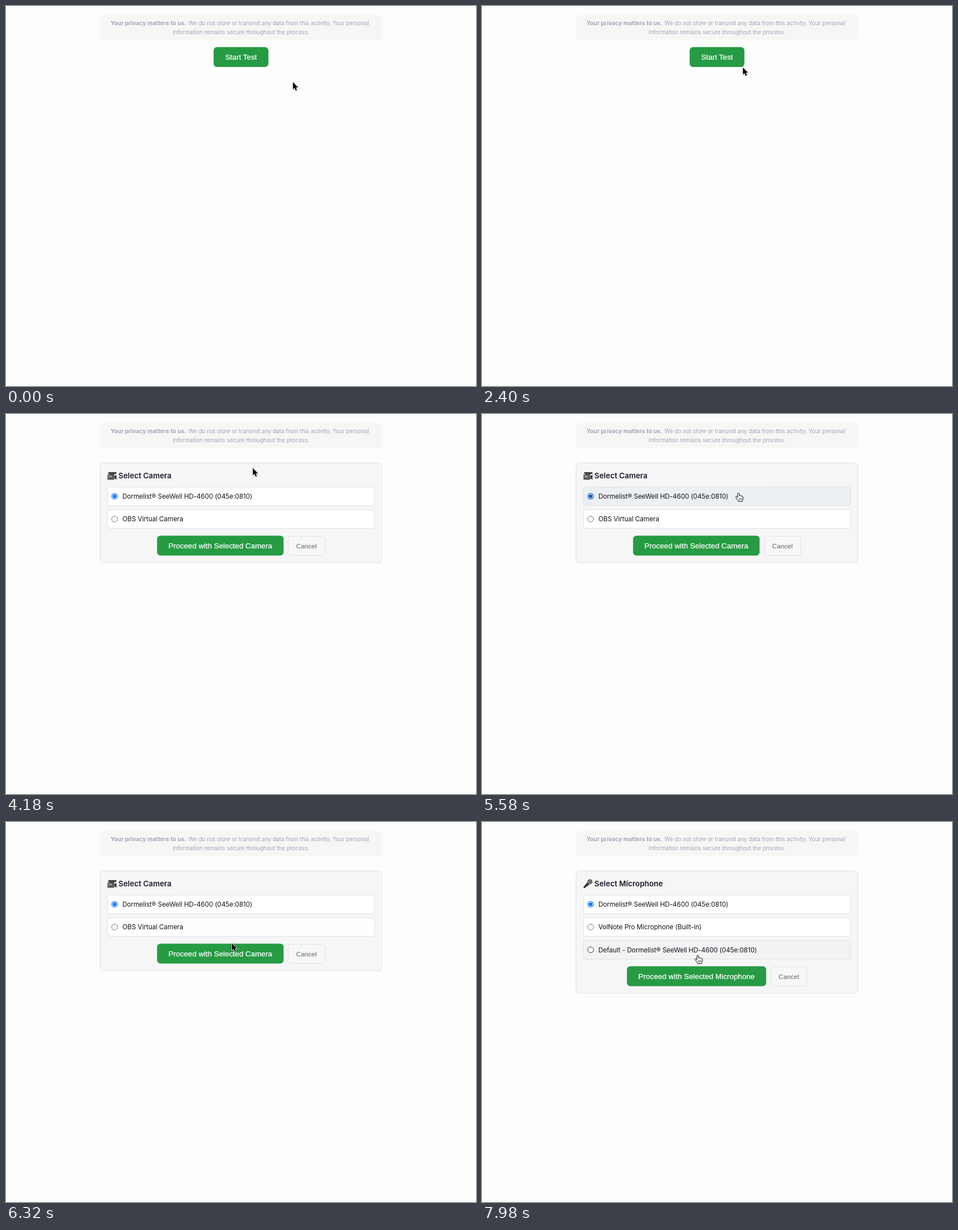
Recreate the animation shown at these times as an HTML page. Size 832x673 px, loop 8 s.

```html
<!DOCTYPE html>
<html lang="en">
<head>
<meta charset="utf-8">
<title>Device test</title>
<style>
html, body { margin: 0; width: 100%; height: 100%; overflow: hidden; background: #fdfdfc; }
svg { display: block; width: 832px; height: 673px; }
text { font-family: Inter, sans-serif; white-space: pre; }
.note { font-size: 10px; fill: #a1a5b8; letter-spacing: -.006em; }
.strong { font-weight: 700; letter-spacing: .011em; }
.title { font-size: 13.33px; font-weight: 600; fill: #1a1a2e; }
.label { font-size: 11.67px; fill: #14141e; letter-spacing: -.007em; }
.button { font: 13.33px "Liberation Sans", Arial, sans-serif; fill: #fff; stroke: #fff; stroke-width: .25px; text-anchor: middle; }
.cancel { font-size: 11.67px; fill: #5b606c; stroke: none; }
</style>
</head>
<body>
<svg id="stage" viewBox="0 0 832 673">
  <rect x="166.5" y="16" width="499" height="44" rx="4" fill="#f6f6f5"/>
  <text class="note strong" x="185" y="34">Your privacy matters to us.</text>
  <text class="note" x="323" y="34">We do not store or transmit any data from this activity. Your personal</text>
  <text class="note" x="416" y="50" text-anchor="middle">information remains secure throughout the process.</text>
  <g id="scene"></g>
  <g id="cursor"></g>
</svg>
<script>
const LOOP = 8000, CAMERA_AT = 3960, MIC_AT = 7400, FADE = 200;
const DEVICE = 'Dormelist® SeeWell HD-4600 (045e:0810)';

// Pointer hotspot: time, x, y
const PATH = [
  [0, 508, 135], [900, 508, 135], [1240, 501, 129], [2080, 473, 115], [2400, 462, 109],
  [2920, 452, 104], [3660, 439, 97], [3800, 437, 96], [4500, 437, 96], [5250, 454, 140],
  [5800, 454, 140], [6020, 419, 192], [6600, 382, 236], [LOOP, 382, 236]
];

const CAMERA_ICON = `
  <path d="M181 103H195.5V106H192V108H183V106H181Z" fill="#3f3f42"/>
  <rect x="179.6" y="107" width="12" height="9.6" rx="1.2" fill="#59595c"/>
  <path d="M191.6 110L195.6 107.5V116.3L191.6 114Z" fill="#3f3f42"/>
  <rect x="181.5" y="109" width="6" height="3.4" fill="#97979a"/>`;
const MIC_ICON = `
  <path d="M187 106L179.3 115.6L181.2 117.4L191 110Z" fill="#37373a"/>
  <circle cx="191" cy="105.8" r="4.6" fill="#66666a"/>
  <path d="M187 105.4L191.5 110" stroke="#a5a5a8" stroke-width="1.3"/>
  <path d="M189.5 103L194 107.3M192 102L188.5 107" stroke="#8e8e92" stroke-width=".7"/>`;

const ARROW = `<path d="M0 0V12.6L2.8 10L4.9 14.7L7 13.8L5 9.2H9Z" stroke="#fff" stroke-width="1.6"
  stroke-linejoin="round" paint-order="stroke" style="filter:drop-shadow(0 .8px .8px #0006)"/>`;
const HAND = `<g stroke="#111" fill="#fff" stroke-linejoin="round" style="filter:drop-shadow(0 .8px .8px #0004)">
  <path d="M-1.4 8.2V1.4Q-1.3 .2 0 .2T1.4 1.4V5Q1.6 4.3 2.6 4.4T3.8 5.3Q4 4.8 4.9 4.9T6.1 5.9Q6.4 5.6 7.1 5.8
  Q8 6.1 8 7.2V9.5Q8 11.5 6.7 13.2V14.7H0V13.4Q-2 11.6-3 10Q-4.5 8.2-4.8 7.4Q-4.8 6.2-3.6 6.2Q-2.5 6.5-1.4 8.2Z"/>
  <path d="M1.2 9V12M3.3 9V12M5.4 9V12" stroke-width=".8"/></g>`;

const row = (i, label) => ({ kind: 'row', x: 179.5, y: 129.3 + 40.3 * i, w: 473, h: 33, label, first: i === 0 });
const button = (x, y, w, label) => ({ kind: 'button', x, y, w, h: 35.2, label });
const cancel = (x, y, w) => ({ kind: 'cancel', x, y, w, h: 34, label: 'Cancel' });

const SCREENS = {
  start: { items: [button(367.5, 72.8, 97, 'Start Test')] },
  camera: {
    title: 'Select Camera', icon: CAMERA_ICON, height: 177,
    items: [row(0, DEVICE), row(1, 'OBS Virtual Camera'),
      button(267.4, 215.6, 224, 'Proceed with Selected Camera'), cancel(499.5, 216.5, 65)]
  },
  mic: {
    title: 'Select Microphone', icon: MIC_ICON, height: 217,
    items: [row(0, DEVICE), row(1, 'VolNote Pro Microphone (Built-in)'), row(2, 'Default - ' + DEVICE),
      button(256.5, 255.6, 246.5, 'Proceed with Selected Microphone'), cancel(511.5, 256.5, 63.5)]
  }
};

const screenAt = t => SCREENS[t < CAMERA_AT ? 'start' : t < MIC_AT ? 'camera' : 'mic'];

function pointerAt(t) {
  const i = Math.max(1, PATH.findIndex(key => key[0] >= t));
  const [t0, x0, y0] = PATH[i - 1], [t1, x1, y1] = PATH[i];
  const k = (t - t0) / (t1 - t0);
  return [x0 + (x1 - x0) * k, y0 + (y1 - y0) * k];
}

function isOver(item, t) {
  const [x, y] = pointerAt(t);
  return x >= item.x && x <= item.x + item.w && y >= item.y && y <= item.y + item.h;
}

// Share of the last FADE ms during which the item was hovered
function hoverAmount(item, t) {
  let hits = 0;
  for (let age = 0; age < FADE; age += 20) {
    const past = Math.max(0, t - age);
    if (screenAt(past) === screenAt(t) && isOver(item, past)) hits++;
  }
  return hits / (FADE / 20);
}

function mix(from, to, k) {
  return `rgb(${from.map((v, i) => Math.round(v + (to[i] - v) * k))})`;
}

function box({ x, y, w, h }, fill, stroke = 'none', radius = 4) {
  return `<rect x="${x}" y="${y}" width="${w}" height="${h}" rx="${radius}" fill="${fill}" stroke="${stroke}"/>`;
}

function radio(item, t) {
  const at = `cx="192.2" cy="${item.y + 16.4}"`;
  if (!item.first) {
    return `<circle ${at} r="5.2" fill="#fff" stroke="${isOver(item, t) ? '#3c3c40' : '#767676'}"/>`;
  }
  const blue = t > 5480 && t < 5720 ? '#0057c2' : '#0075ff';
  return `<circle ${at} r="5.1" fill="#fff" stroke="${blue}" stroke-width="1.1"/><circle ${at} r="3.3" fill="${blue}"/>`;
}

function drawItem(item, t) {
  const { kind, x, y, w, label } = item, hover = hoverAmount(item, t), middle = x + w / 2;
  if (kind === 'row') {
    const tint = item.first ? [236, 239, 243] : [243, 243, 244];
    return box(item, mix([255, 255, 255], tint, hover), '#dee1e6') + radio(item, t) +
      `<text class="label" x="206" y="${y + 20.8}">${label}</text>`;
  }
  if (kind === 'button') {
    return box(item, mix([38, 155, 67], [33, 138, 59], hover), 'none', 6) +
      `<text class="button" x="${middle}" y="${y + 22}">${label}</text>`;
  }
  return box(item, '#f7f7f7', '#dee1e6') +
    `<text class="button cancel" x="${middle}" y="${y + 21}">${label}</text>`;
}

function render(t) {
  const { title, icon, height, items } = screenAt(t);
  const panel = title ? box({ x: 166.5, y: 86.5, w: 499, h: height }, '#f6f6f6', '#dee1e6', 6) + icon +
    `<text class="title" x="199" y="114.3">${title}</text>` : '';
  scene.innerHTML = panel + items.map(item => drawItem(item, t)).join('');
  const [x, y] = pointerAt(t);
  cursor.setAttribute('transform', `translate(${x} ${y})`);
  cursor.innerHTML = items.some(item => isOver(item, t)) ? HAND : ARROW;
}

const scene = document.getElementById('scene'), cursor = document.getElementById('cursor');
const begin = performance.now();
function tick() {
  render((performance.now() - begin) % LOOP);
  requestAnimationFrame(tick);
}
tick();
</script>
</body>
</html>
```
